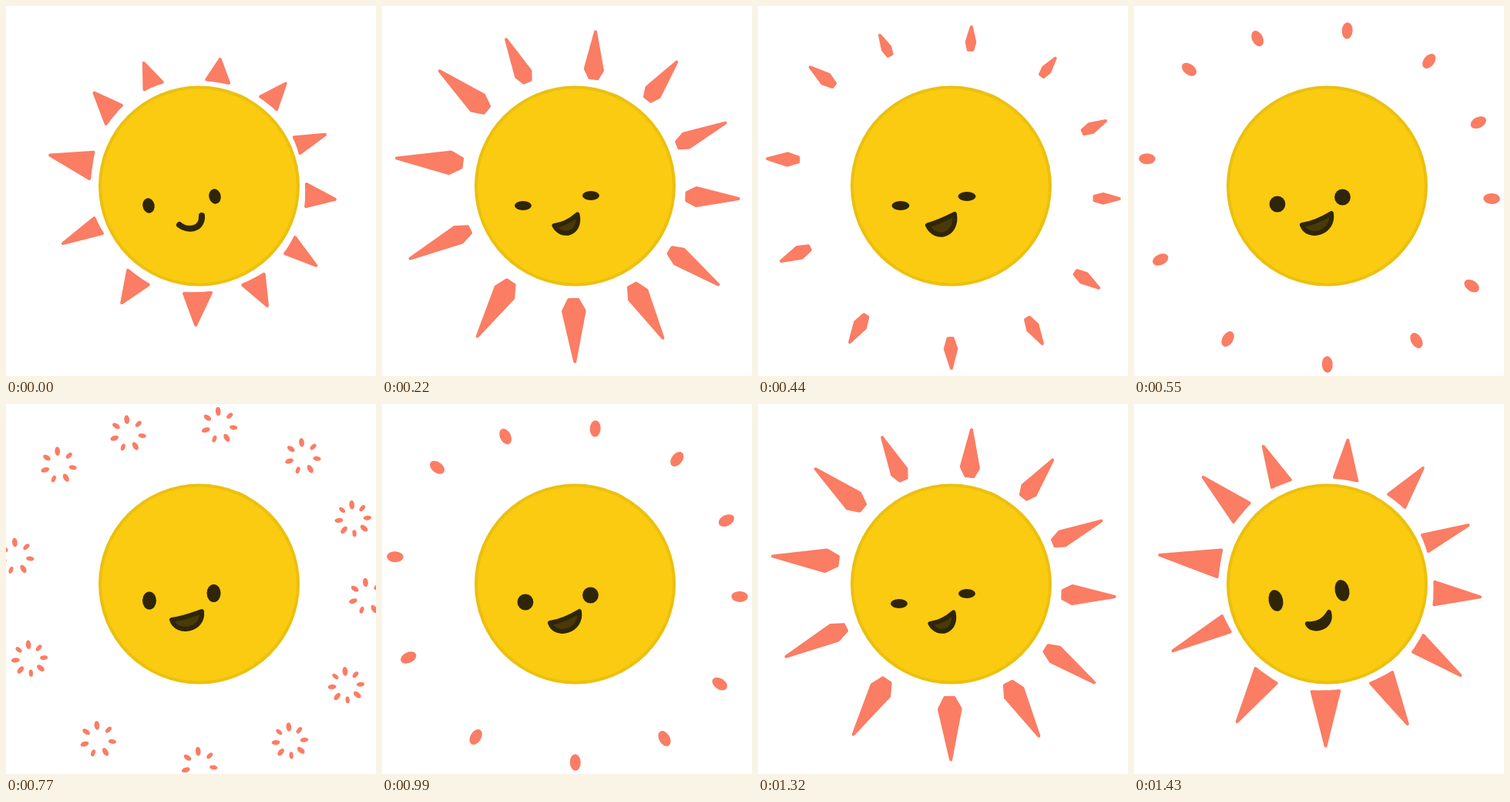
These frames come from a looping animation (480x480 px, 1.54 s). An HTML page with a canvas:

```html
<!DOCTYPE html>
<html lang="en">
<head>
<meta charset="utf-8">
<title>Happy sun</title>
<style>
  html, body { margin: 0; width: 100%; height: 100%; overflow: hidden; background: #fff; }
  canvas { display: block; width: 480px; height: 480px; }
</style>
</head>
<body>
<canvas id="stage" width="480" height="480"></canvas>
<script>
const ctx = document.getElementById('stage').getContext('2d');
const STEP = 110, STEPS = 14;
const CORAL = '#fa7d64', INK = '#2f2508';

// Base corners a and b, short tip, inner end, far tip, petal count
const RAYS = [
  [178,110, 205,99,  178,72,  187,95,  157,36,  7],
  [258,96,  291,101, 278,67,  274,93,  277,25,  7],
  [328,117, 352,136, 364,99,  347,118, 387,66,  7],
  [372,169, 381,193, 416,166, 387,181, 453,148, 8],
  [389,229, 388,262, 429,251, 398,249, 471,250, 7],
  [375,298, 360,322, 404,338, 377,322, 444,367, 8],
  [336,346, 305,362, 340,391, 327,367, 370,440, 8],
  [268,371, 229,372, 246,416, 248,386, 251,472, 7],
  [187,362, 157,341, 149,387, 164,362, 118,438, 7],
  [127,296, 115,273, 72,309,  109,294, 28,332,  8],
  [109,226, 115,188, 55,193,  99,201,  10,198,  7],
  [129,155, 152,128, 113,111, 134,130, 66,78,   7]
].map(([ax, ay, bx, by, sx, sy, ix, iy, tx, ty, petals]) =>
  ({ a: [ax, ay], b: [bx, by], short: [sx, sy], inner: [ix, iy], tip: [tx, ty], petals }));

// Left corner, upper lip, right corner, lower lip (two Bezier curves)
const SMILE   = [225,284, 235,292, 255,291, 254,272, 255,291, 235,292];
const GRIN    = [225,285, 238,287, 248,279, 253,270, 259,292, 230,297];
const LAUGH   = [222,285, 232,280, 244,275, 254,271, 259,300, 235,308];
const OPEN    = [218,284, 232,282, 246,275, 256,269, 260,295, 225,304];
const DELIGHT = [215,280, 230,278, 243,273, 254,269, 257,294, 221,300];

const mix = (p, q, k) => p.map((v, i) => v + (q[i] - v) * k);
const MOUTHS = [SMILE, GRIN, mix(GRIN, LAUGH, .5), LAUGH,
  mix(LAUGH, OPEN, .5), OPEN, mix(OPEN, DELIGHT, .5), DELIGHT];

// Left centre, right centre, radii; null means shut
const EYES = [
  [185,259, 271,247, 7.7, 9.8],
  [184,255, 270,242, 9.3, 14],
  [183,259, 271,246, 11, 6],
  null,
  [185,259, 271,247, 11.5, 6],
  [186,257, 270.5,248, 10.4, 10.6],
  [186,256, 270,246.5, 9.8, 11.2],
  [186,255, 269.5,245.5, 9, 11.6]
];

function ellipse(x, y, rx, ry, angle, color) {
  ctx.fillStyle = color;
  ctx.beginPath();
  ctx.ellipse(x, y, rx, ry, angle, 0, 2 * Math.PI);
  ctx.fill();
}

function paint(path, width, stroke, fill) {
  ctx.lineWidth = width;
  ctx.strokeStyle = stroke;
  if (fill) {
    ctx.fillStyle = fill;
    ctx.fill(path);
  }
  ctx.stroke(path);
}

// Polygon with soft corners, kept inside its own points
function softPolygon(points) {
  const centre = [0, 1].map(i => points.reduce((sum, p) => sum + p[i], 0) / points.length);
  const path = new Path2D();
  for (const p of points) {
    const d = Math.hypot(p[0] - centre[0], p[1] - centre[1]);
    path.lineTo(...mix(p, centre, Math.min(1, 2.2 / d)));
  }
  path.closePath();
  paint(path, 4, CORAL, CORAL);
}

function drawRay({ a, b, short, inner, tip, petals }, pose) {
  const dx = tip[0] - inner[0], dy = tip[1] - inner[1];
  const length = Math.hypot(dx, dy), angle = Math.atan2(dy, dx);
  const onAxis = (along, side) => [
    inner[0] + dx * along - dy / length * side,
    inner[1] + dy * along + dx / length * side];

  if (pose < 5) {
    const leaving = [0, 0, .5, 1, 1][pose];
    const start = pose === 4 ? .5 : 0;
    const half = length * (pose === 4 ? .11 : .142);
    const shoulder = start + (1 - start) * .37;
    const mid = mix(a, b, .5);
    softPolygon([
      mix(mix(mid, a, .5), onAxis(start, -3.5), leaving),
      mix(a, onAxis(shoulder, -half), leaving),
      mix(short, tip, [0, .53, .85, 1, 1][pose]),
      mix(b, onAxis(shoulder, half), leaving),
      mix(mix(mid, b, .5), onAxis(start, 3.5), leaving)
    ]);
  } else if (pose === 5) {
    ellipse(...onAxis(1 - 7 / length, 0), 10.8, 7, angle, CORAL);
  } else {
    const [cx, cy] = onAxis(1 - 3 / length, 0);
    const radius = pose === 6 ? 11 : 18.5;
    for (let i = 0; i < petals; i++) {
      const turn = -1.66 + i * 2 * Math.PI / petals;
      const size = 1 + .12 * Math.cos(i * 2.3);
      ellipse(cx + radius * Math.cos(turn), cy + radius * Math.sin(turn),
        5.2 * size, 3 * size, turn, CORAL);
    }
  }
}

function drawSun() {
  ellipse(250.5, 233.5, 130.5, 130, 0, '#ebc00f');
  ellipse(250.5, 233.5, 126.5, 126, 0, '#facb10');
  paint(new Path2D('M295 114Q304 116 312 121'), 4, '#ebc00f');
}

function drawFace(pose) {
  const eyes = EYES[pose];
  if (eyes) {
    const [lx, ly, rx, ry, w, h] = eyes;
    const tilt = pose < 2 ? -.2 : 0;
    ellipse(lx, ly, w, h, tilt, INK);
    ellipse(rx, ry, w, h, tilt, INK);
  } else {
    paint(new Path2D('M170 268Q177 256 195 259M262 252Q270 242 285 247'), 6.5, INK);
  }
  const m = MOUTHS[pose];
  const path = new Path2D(`M${m.slice(0, 2)}C${m.slice(2, 8)}C${m.slice(8)},${m.slice(0, 2)}Z`);
  paint(path, pose ? 6 : 8, INK, pose > 1 ? '#483a09' : INK);
}

function draw(now) {
  const step = Math.floor(now / STEP) % STEPS;
  const pose = Math.min(step, STEPS - step);
  ctx.fillStyle = '#fff';
  ctx.fillRect(0, 0, 480, 480);
  ctx.lineCap = ctx.lineJoin = 'round';
  for (const ray of RAYS) drawRay(ray, pose);
  drawSun();
  drawFace(pose);
}

const begin = performance.now();
function tick() {
  draw(performance.now() - begin);
  requestAnimationFrame(tick);
}
tick();
</script>
</body>
</html>
```
